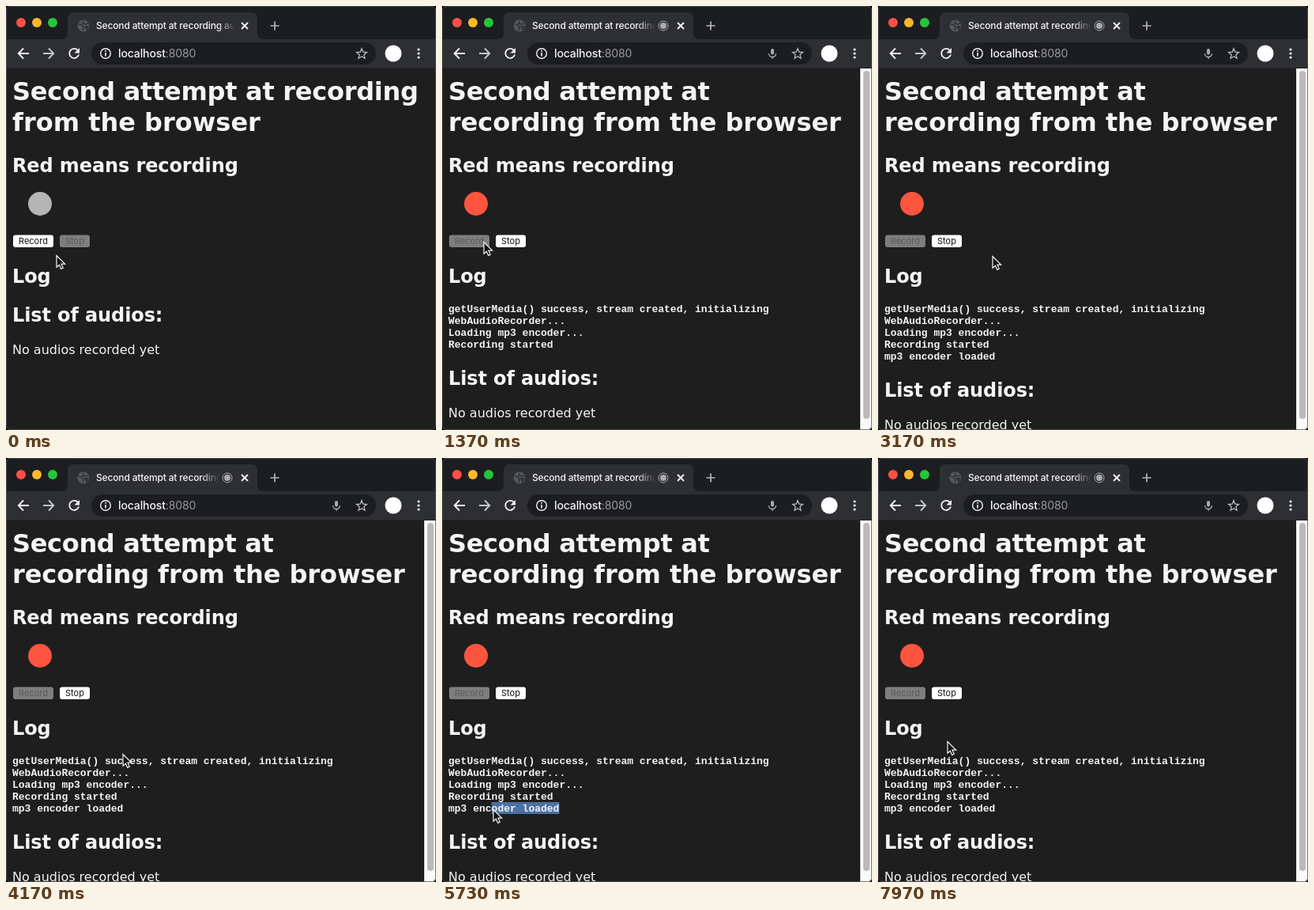
Write an HTML page that moves like this. It is 544 by 536 pixels and loops after 8000 ms.

```html
<!DOCTYPE html>
<html lang="en">
<head>
<meta charset="utf-8">
<title>Recording page</title>
<style>
html, body { margin: 0; width: 100%; height: 100%; overflow: hidden; background: #000; }
svg { display: block; width: 544px; height: 536px; }
text { fill: #f4f4f4; font-family: "DejaVu Sans", Verdana, sans-serif; }
.ui text { font: 500 12px Inter, sans-serif; }
.h1 { font-size: 32px; font-weight: 700; }
.h2 { font-size: 24px; font-weight: 700; letter-spacing: -.11px; }
.log text { font: 700 13px "Liberation Mono", monospace; }
.button text { font: 11px Inter, sans-serif; fill: #111; }
.button rect { fill: #fff; }
.off text { fill: #5c5c5c; }
.off rect { fill: #7e7e7e; }
.line { fill: none; stroke: #f1f1f2; stroke-width: 1.9; }
</style>
</head>
<body>
<svg viewBox="0 0 544 536">
  <defs>
    <linearGradient id="wide" gradientUnits="userSpaceOnUse" x1="268" x2="290">
      <stop stop-color="#f4f4f4"/><stop offset="1" stop-color="#f4f4f4" stop-opacity="0"/>
    </linearGradient>
    <linearGradient id="narrow" gradientUnits="userSpaceOnUse" x1="246" x2="270">
      <stop stop-color="#f4f4f4"/><stop offset="1" stop-color="#f4f4f4" stop-opacity="0"/>
    </linearGradient>
    <clipPath id="frame"><rect width="544" height="536" rx="5"/></clipPath>
  </defs>
  <g clip-path="url(#frame)">
    <rect width="544" height="536" fill="#1e1e1e"/>

    <g class="ui">
      <rect width="544" height="42" fill="#1c1d20"/>
      <path d="M0 42H70Q78 42 78 34V16Q78 8 86 8H310Q318 8 318 16V34Q318 42 326 42H544V78.500H0Z" fill="#2e2f33"/>
      <circle cx="19" cy="21" r="6" fill="#ff4f49"/>
      <circle cx="39" cy="21" r="6" fill="#fdb72b"/>
      <circle cx="59" cy="21" r="6" fill="#25c53b"/>
      <circle cx="98" cy="25" r="7.500" fill="#56575b"/>
      <path d="M92 23l4 1 2 3-1 4M98 19l-1 3 4 1 3-1M100 26l4 0-2 4z" fill="none" stroke="#2e2f33" stroke-width="1.500"/>
      <text id="title" x="114" y="29" letter-spacing="-.16">Second attempt at recording au</text>
      <g id="live" fill="#a9aaad">
        <circle cx="280" cy="25" r="6" fill="none" stroke="#a9aaad"/>
        <circle cx="280" cy="25" r="4"/>
      </g>
      <path class="line" stroke-width="1.600" d="M298 21l8 8M306 21l-8 8"/>
      <path class="line" style="stroke:#b4b5b8;stroke-width:1.700" d="M334.500 25h11M340 19.500v11"/>

      <path class="line" d="M29 60H16.500M22 53.500L15.800 60L22 66.500"/>
      <path class="line" style="stroke:#c4c5c8" d="M47 60H59.500M54 53.500L60.200 60L54 66.500"/>
      <path class="line" d="M90.800 56A6 6 0 1 0 92 61.500"/>
      <path d="M93 53v6.500h-6.500z" fill="#f1f1f2"/>
      <rect x="108" y="46" width="360" height="28" rx="14" fill="#1c1d20"/>
      <circle class="line" style="stroke-width:1.400" cx="126" cy="60" r="6.300"/>
      <path class="line" style="stroke-width:1.600" d="M126 59v4.500M126 56v1.700"/>
      <text x="142" y="65" style="font-size:14px" letter-spacing="-.12">localhost<tspan fill="#98999c" font-weight="400">:8080</tspan></text>
      <g id="mic">
        <rect x="416" y="54" width="4" height="7.500" rx="2" fill="#a9aaad"/>
        <path class="line" style="stroke:#a9aaad;stroke-width:1.300" d="M413.500 60a4.500 4.500 0 0 0 9 0M418 64.500v2.500"/>
      </g>
      <path class="line" style="stroke:#b9babd;stroke-width:1.300" d="M450 53.800l1.800 4.300 4.700 .4-3.600 3.100 1.100 4.600-4-2.500-4 2.500 1.100-4.600-3.600-3.100 4.700-.4z"/>
      <circle cx="490" cy="60" r="10.500" fill="#fff"/>
      <g fill="#f1f1f2">
        <circle cx="522" cy="55" r="1.600"/><circle cx="522" cy="60" r="1.600"/><circle cx="522" cy="65" r="1.600"/>
      </g>
    </g>

    <g id="before" class="h1">
      <text x="8" y="119" letter-spacing="-.27">Second attempt at recording</text>
      <text x="8" y="158">from the browser</text>
    </g>
    <g id="after" class="h1">
      <text x="8" y="119" letter-spacing="-.33">Second attempt at</text>
      <text x="8" y="158" letter-spacing="-.08">recording from the browser</text>
    </g>
    <text class="h2" x="8" y="210">Red means recording</text>
    <circle id="lamp" cx="43" cy="250" r="15"/>
    <g id="record" class="button"><rect x="9" y="289.500" width="51" height="15.500" rx="3"/><text x="16" y="301">Record</text></g>
    <g id="stop" class="button"><rect x="68" y="289.500" width="38" height="15.500" rx="3"/><text x="75" y="301">Stop</text></g>
    <text class="h2" x="8" y="350">Log</text>
    <g id="log" class="log"></g>
    <g id="list">
      <text class="h2" x="8" y="399">List of audios:</text>
      <text x="8" y="440" font-size="16">No audios recorded yet</text>
    </g>
    <g id="bar">
      <rect x="529" y="79" width="15" height="457" fill="#f9f9f9"/>
      <path d="M529.500 79V536" stroke="#e6e6e6"/>
      <rect x="533" y="82" width="8" height="440" rx="4" fill="#bababa"/>
    </g>
    <path id="cursor" d="M0 .5V15.200L3.400 12.200L5.700 17.400L8.200 16.300L6 11.200H10.600Z" fill="#141414" stroke="#f4f4f4" stroke-width="1.200"/>
    <rect x=".5" y=".5" width="543" height="535" rx="5" fill="none" stroke="#56575a" stroke-opacity=".8"/>
  </g>
</svg>
<script>
const $ = id => document.getElementById(id);
const START = 1270, MIC = 1040, LOADED = 1480;
const DRAG = 5350, CLEAR = 7620;
const CHAR = 7.8, LINE = 15, TOP = 375;
const lines = [
  "getUserMedia() success, stream created, initializing",
  "WebAudioRecorder...",
  "Loading mp3 encoder... ",
  "Recording started",
  "mp3 encoder loaded"
];
// Cursor stops: time, x, y
const path = [
  [0, 64, 315], [100, 64, 315], [760, 51, 298], [1330, 51, 298],
  [1850, 145, 316], [3800, 145, 316], [4600, 152, 446], [DRAG, 152, 446],
  [6050, -1, 442], [6670, -1, 442], [6960, -1, 413], [7180, -1, 413],
  [7600, 88, 358], [8000, 88, 358]
];

const add = (tag, attrs) => {
  const el = document.createElementNS("http://www.w3.org/2000/svg", tag);
  for (const k in attrs) el.setAttribute(k, attrs[k]);
  return $("log").appendChild(el);
};
const rows = lines.map((s, i) => {
  const mark = add("rect", { y: TOP + i * LINE, height: LINE, fill: "#4b70a2" });
  const text = add("text", { x: 8, y: TOP + 12 + i * LINE });
  text.textContent = s;
  return { mark, text, length: s.length };
});

const show = (el, on) => el.style.display = on ? "" : "none";
const clamp = (v, lo, hi) => Math.max(lo, Math.min(hi, v));

function cursorAt(t) {
  const i = path.findIndex(p => p[0] > t);
  const [t0, x0, y0] = path[i - 1], [t1, x1, y1] = path[i];
  const u = (t - t0) / (t1 - t0), e = u * u * (3 - 2 * u);
  return [x0 + (x1 - x0) * e, y0 + (y1 - y0) * e];
}

function select(on, x, y) {
  const focus = clamp(Math.floor((y - TOP) / LINE), 0, lines.length - 1);
  rows.forEach(({ mark, length }, i) => {
    const from = i === focus ? clamp(Math.round((x - 8) / CHAR), 0, length) : 0;
    show(mark, on && i >= focus);
    mark.setAttribute("x", 8 + from * CHAR);
    mark.setAttribute("width", (length - from) * CHAR);
  });
}

function draw(t) {
  const rec = t >= START, count = !rec ? 0 : t < LOADED ? 4 : 5;
  const [x, y] = cursorAt(t);
  show($("before"), !rec);
  for (const id of ["after", "live", "bar"]) show($(id), rec);
  show($("mic"), t >= MIC);
  $("title").style.fill = `url(#${rec ? "narrow" : "wide"})`;
  $("lamp").setAttribute("fill", rec ? "#ff553e" : "#b5b5b5");
  $("record").classList.toggle("off", rec);
  $("stop").classList.toggle("off", !rec);
  rows.forEach((r, i) => show(r.text, i < count));
  $("list").setAttribute("transform", `translate(0 ${count && count * LINE + 20})`);
  select(t >= DRAG && t < CLEAR, x, Math.max(y, 406));
  $("cursor").setAttribute("transform", `translate(${Math.round(x)} ${Math.round(y)})`);
}

const begin = performance.now();
function tick() {
  draw((performance.now() - begin) % 8000);
  requestAnimationFrame(tick);
}
tick();
</script>
</body>
</html>
```
